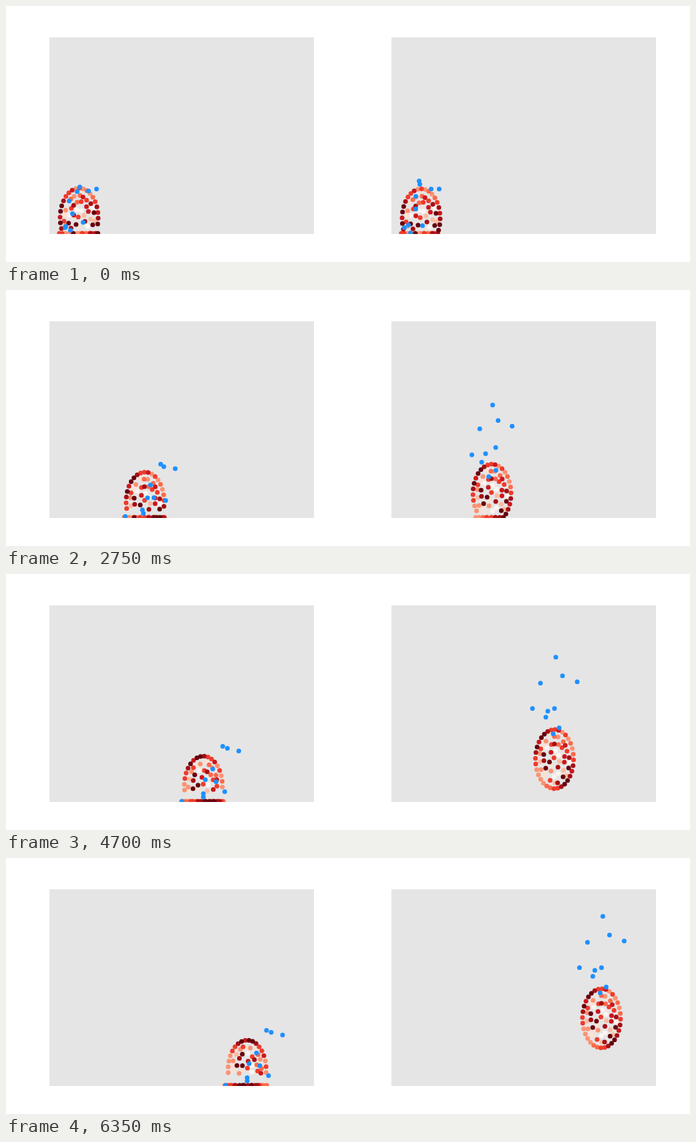
Animation, 1024 px wide and 384 px high, one loop 6400 ms. Source, as an HTML page with a canvas:

```html
<!DOCTYPE html>
<html lang="en">
<head>
<meta charset="utf-8">
<title>Rolling cells</title>
<style>
  html, body { margin: 0; width: 100%; height: 100%; overflow: hidden; background: #fff; }
  canvas { display: block; }
</style>
</head>
<body>
<canvas id="stage" width="1024" height="384"></canvas>
<script>
const ctx = document.getElementById('stage').getContext('2d');
const LOOP = 6400, STEP = 50, FLOOR = 341, RX = 28.5, RY = 44.3;
const reds = ['#fff5f0', '#fee0d2', '#fcbba1', '#fc9272', '#fb6a4a', '#ef3b2c', '#cb181d', '#a50f15', '#67000d'];

let seed = 7;
function random() {
  seed = (seed * 1664525 + 1013904223) % 4294967296;
  return seed / 4294967296;
}

// One ring of dots on the unit disc; angles run clockwise from the top
function ring(count, radius, jitter, shadeAt) {
  return Array.from({ length: count }, (_, i) => {
    const angle = 0.03 + i * 2 * Math.PI / count;
    const wobble = () => (random() - 0.5) * jitter;
    const shade = Math.round(shadeAt(angle));
    return {
      x: radius * Math.sin(angle) + wobble(),
      y: -radius * Math.cos(angle) + wobble(),
      shade: Math.max(0, Math.min(8, shade))
    };
  });
}

const anyShade = () => random() * 8;
// The rim is dark at the top left and bottom right, pale in between
const rimShade = angle => 5 + 2.3 * Math.cos(2 * angle - 5) + (random() - 0.5) * 3;

const cell = [
  ...ring(32, 1, 0, rimShade),
  ...ring(22, 0.77, 0.12, anyShade),
  ...ring(14, 0.53, 0.14, anyShade),
  ...ring(7, 0.28, 0.14, anyShade),
  ...ring(1, 0, 0.1, anyShade)
].sort((a, b) => a.shade - b.shade);

// Progress p runs from 0 to 1; blue dots go from x, y to x, y around the cell centre
const travel = p => p - 0.073 * (1 - p) * Math.sin(Math.PI * p / 0.75);
const drift = p => Math.sin(Math.min(1, p / 0.74) * Math.PI / 2);

const panels = [
  {
    left: 65,
    cx: p => 109.5 + 251.5 * travel(p),
    cy: () => 317.5,
    spin: p => -0.6 + 1.45 * p ** 1.2,
    sink: p => 335 - 10 * p,
    blue: [
      [1, -46, 29, -59], [-3, -39, 36, -56], [14, -40, 53, -52], [26, -43, 32, 9], [-15, -25, 14, -25],
      [-10, -6, 19, -6], [6, 7, 3, -9], [-20, 13, 0, 12], [-13, 19, 0, 17], [-21, 15, -32, 24]
    ]
  },
  {
    left: 577,
    cx: p => 621.5 + 270 * travel(p),
    cy: p => 318.5 - 78 * p ** 2.15,
    spin: p => -0.6 * (1 - p) ** 4,
    sink: () => 337,
    blue: [
      [-3, -56, 2, -153], [-2, -51, 12, -125], [15, -44, 34, -116], [-8, -33, -21, -114], [27, -44, 0, -76],
      [-8, -14, -10, -72], [-19, 10, -33, -76], [-25, 14, -13, -63], [2, 11, 7, -47], [-16, 22, -2, -38]
    ]
  }
];

function dot(x, y, color) {
  ctx.fillStyle = color;
  ctx.beginPath();
  ctx.arc(x, y, 3.5, 0, 2 * Math.PI);
  ctx.fill();
}

function drawCell(panel, cx, cy, p) {
  const spin = panel.spin(p), sin = Math.sin(spin), cos = Math.cos(spin);
  const touching = cy + RY > FLOOR + 2;
  for (const { x, y, shade } of cell) {
    const dx = RX * (x * cos - y * sin);
    const dotY = cy + RY * (x * sin + y * cos);
    // Dots that touch the ground lie flat and trail slightly
    if (touching && dotY > panel.sink(p)) dot(cx - 2 + dx * 1.15, FLOOR, reds[shade]);
    else dot(cx + dx, dotY, reds[shade]);
  }
}

function drawBlue(panel, cx, cy, p) {
  const k = drift(p);
  for (const [x0, y0, x1, y1] of panel.blue) {
    const y = cy + y0 + (y1 - y0) * k;
    dot(cx + x0 + (x1 - x0) * k, Math.min(FLOOR, y), '#1e90ff');
  }
}

function draw(t) {
  const p = t / (LOOP - STEP);
  ctx.fillStyle = '#fff';
  ctx.fillRect(0, 0, 1024, 384);
  for (const panel of panels) {
    const cx = panel.cx(p), cy = panel.cy(p);
    ctx.save();
    ctx.beginPath();
    ctx.rect(panel.left, 47, 396, 295);
    ctx.clip();
    ctx.fillStyle = '#e5e5e5';
    ctx.fillRect(panel.left, 47, 396, 295);
    drawCell(panel, cx, cy, p);
    drawBlue(panel, cx, cy, p);
    ctx.restore();
  }
}

function frame() {
  draw(Math.floor(performance.now() % LOOP / STEP) * STEP);
  requestAnimationFrame(frame);
}
frame();
</script>
</body>
</html>
```
